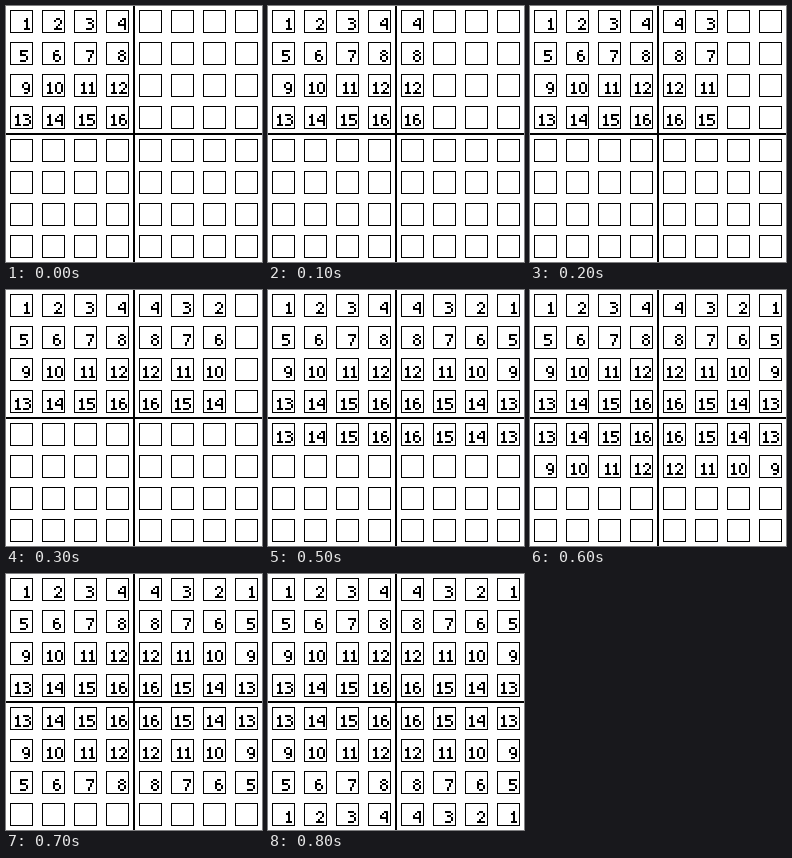
Write an HTML page that moves like this. It is 256 px wide and 256 px high and loops after 0.9 s.

```html
<!DOCTYPE html>
<html lang="en">
<head>
<meta charset="utf-8">
<title>Mirrored grid</title>
<style>
  html, body { margin: 0; width: 100%; height: 100%; overflow: hidden; background: #fff; }
  svg { display: block; width: 100%; height: 100%; }
  path, rect { fill: none; stroke: #000; shape-rendering: crispEdges; }
  .thick { stroke-width: 2; }
</style>
</head>
<body>
<svg viewBox="0 0 256 256"></svg>
<script>
const SIZE = 8, HALF = 4, STEP_MS = 100, STEPS = 9;
const svg = document.querySelector('svg');

// Pixel-style digits, 12 high, drawn with 2px strokes
const DIGITS = [
  'M2 1H6M1 2V10M7 2V10M2 11H6',
  'M3 0V12M0 3H4M0 11H6',
  'M2 1H6M0 3H2M6 3H8M6 5H8M4 7H6M2 9H4M0 11H8',
  'M0 1H6M7 2V4M2 5H6M7 6V10M0 11H6',
  'M7 0V12M4 1H8M2 3H4M0 5H2M0 7H8',
  'M0 1H8M1 0V6M0 5H6M7 6V10M0 11H6',
  'M2 1H6M1 2V10M2 5H6M7 6V10M2 11H6',
  'M0 1H8M7 2V4M5 4V8M3 8V12',
  'M2 1H6M1 2V4M7 2V4M2 5H6M1 6V10M7 6V10M2 11H6',
  'M2 1H6M1 2V6M7 2V10M2 7H8M2 11H6'
];

function add(parent, tag, attrs = {}) {
  const node = document.createElementNS('http://www.w3.org/2000/svg', tag);
  for (const [key, value] of Object.entries(attrs)) node.setAttribute(key, value);
  return parent.appendChild(node);
}

const origin = i => 4 + 32 * i + (i < HALF ? 0 : 1);
const fold = i => Math.min(i, SIZE - 1 - i);
const digitWidth = d => d === 1 ? 6 : 8;

// Labels in the left half sit slightly off the common right edge
function nudge(value, col) {
  if (col >= HALF) return 0;
  if (value > 9) return 1;
  return { 5: -2, 6: -1 }[value] || 0;
}

function drawNumber(parent, value, col, row) {
  let x = origin(col) + 20 + nudge(value, col);
  for (const d of [...String(value)].map(Number).reverse()) {
    x -= digitWidth(d);
    add(parent, 'path', {
      class: 'thick', d: DIGITS[d],
      transform: `translate(${x} ${origin(row) + 8})`
    });
    x -= 2;
  }
}

function revealStep(col, row) {
  if (row >= HALF) return row + 1;
  return col >= HALF ? col - HALF + 1 : 0;
}

add(svg, 'path', { class: 'thick', d: 'M128 0V256M0 128H256' });
const layers = Array.from({ length: STEPS }, () => add(svg, 'g'));

for (let row = 0; row < SIZE; row++) {
  for (let col = 0; col < SIZE; col++) {
    add(svg, 'rect', { x: origin(col) + .5, y: origin(row) + .5, width: 22, height: 22 });
    const value = fold(row) * HALF + fold(col) + 1;
    drawNumber(layers[revealStep(col, row)], value, col, row);
  }
}

layers.forEach((layer, step) => {
  if (!step) return;
  const offset = step / STEPS;
  layer.animate(
    [{ opacity: 0 }, { opacity: 0, offset }, { opacity: 1, offset }, { opacity: 1 }],
    { duration: STEPS * STEP_MS, iterations: Infinity }
  );
});
</script>
</body>
</html>
```
